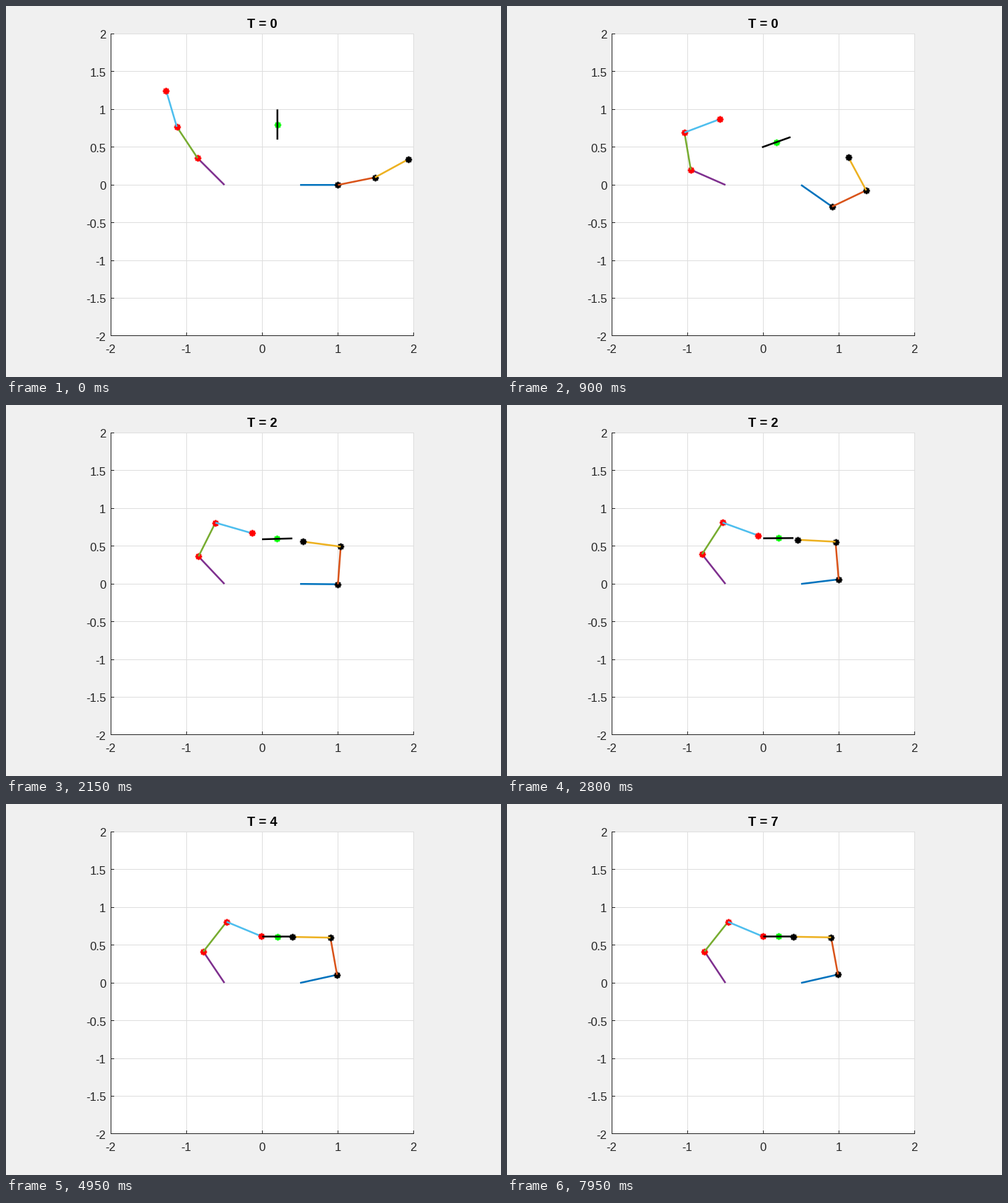
Animation, 700 px wide and 525 px high, one loop 8 s. Source, as a matplotlib script:

```python
import numpy as np
import matplotlib.pyplot as plt
from matplotlib.animation import FuncAnimation
from matplotlib.markers import MarkerStyle
from matplotlib.path import Path

W, H, DPI = 700, 525, 100
STEP_MS, FRAMES = 50, 160
PT = 72 / DPI                      # points per pixel
LINK, HALF_BAR = 0.5, 0.2
INK, GRID = "#262626", "#dedede"
DECAY = 1.15                       # settling rate per second

plt.rcParams["font.family"] = "Liberation Sans"
plt.rcParams["axes.unicode_minus"] = False

# Pose: three right link angles, three left link angles, bar tilt, bar x, bar y
KEY_T = np.array([0, 0.5, 1.35, 2.15])
KEYS = np.array([
    [0, 11.46, 28.65, 135, 123.54, 106.35, 90, 0.2, 0.8],
    [-31.4, 8.5, 73.6, 158.3, 118, 56.3, 42.3, 0.159, 0.596],
    [-21.2, 54.8, 150.5, 146.3, 81.4, -1.1, 8.3, 0.187, 0.577],
    [-0.5, 85.8, 172.5, 133.3, 63.4, -16.1, 1.6, 0.197, 0.597],
])
REST = np.array([12.9, 100.5, 179, 123.5, 51.6, -22.8, 0, 0.2, 0.615])

# Sum of decaying modes through the keys, starting with zero speed
POWERS = np.arange(1, 6)


def modes(t):
    return np.exp(-DECAY * np.multiply.outer(t, POWERS))


COEF = np.linalg.solve(np.vstack([modes(KEY_T), POWERS]),
                       np.vstack([KEYS - REST, np.zeros_like(REST)]))


def pose(t):
    return REST + modes(t) @ COEF


def px(x):
    return 362.4 + 107 * np.asarray(x)


def py(y):
    return 253.2 - 106.85 * np.asarray(y)


def pixel(v):
    return np.floor(v) + 0.5


fig = plt.figure(figsize=(W / DPI, H / DPI), dpi=DPI, facecolor="#f0f0f0")
ax = fig.add_axes([0, 0, 1, 1])
ax.set_xlim(0, W)
ax.set_ylim(H, 0)
ax.axis("off")


def rule(x, y, color, z):
    ax.plot(x, y, color=color, lw=PT, solid_capstyle="butt", zorder=z, snap=False)


def label(x, y, text, ha):
    ax.text(x, y, text, ha=ha, va="baseline", fontsize=16.67 * PT, color=INK)


LEFT, RIGHT, TOP, BOTTOM = 148, 577, 39, 467
ax.add_patch(plt.Rectangle((LEFT, TOP), RIGHT - LEFT, BOTTOM - TOP,
                           fc="white", ec="none", zorder=0))
for v in np.arange(-2, 2.1, 1):
    x = pixel(px(v))
    rule([x, x], [TOP, BOTTOM], GRID, 1)
    rule([x, x], [BOTTOM, BOTTOM - 5], INK, 2)
    label(px(v) - 0.3, 491, f"{v:g}", "center")
for v in np.arange(-2, 2.1, 0.5):
    y = pixel(py(v))
    rule([LEFT, RIGHT], [y, y], GRID, 1)
    rule([LEFT, LEFT + 5], [y, y], INK, 2)
    label(141.3, py(v) + 6.9, f"{v:g}", "right")
rule([LEFT + 0.5] * 2, [TOP, BOTTOM], INK, 2)
rule([LEFT, RIGHT], [BOTTOM - 0.5] * 2, INK, 2)
title = ax.text(362.5, 31, "", ha="center", va="baseline", weight="bold",
                fontsize=18.33 * PT, color="black")

# Eight-ray star used for joints and the bar centre
D = np.sqrt(0.5)
STAR = MarkerStyle(
    Path([(-1, 0), (1, 0), (0, -1), (0, 1), (-D, -D), (D, D), (-D, D), (D, -D)],
         [Path.MOVETO, Path.LINETO] * 4), capstyle="butt")


def segment(color, z):
    return ax.plot([], [], color=color, lw=2.5 * PT, solid_capstyle="butt",
                   zorder=z, snap=False)[0]


def star(color, z):
    return ax.plot([], [], ls="none", marker=STAR, ms=9.6 * PT, mec=color,
                   mfc="none", mew=2.5 * PT, zorder=z, snap=False)[0]


def make_arm(base, colors, joint_color):
    # Each link lies over the joint it starts from
    parts = [(segment(c, 3 + 2 * i), star(joint_color, 4 + 2 * i))
             for i, c in enumerate(colors)]
    return base, parts


right_arm = make_arm(0.5, ["#0072bd", "#d95319", "#edb120"], "black")
left_arm = make_arm(-0.5, ["#7e2f8e", "#77ac30", "#4dbeee"], "red")
centre = star("lime", 10)
bar = segment("black", 11)


def place_arm(arm, degrees):
    base, parts = arm
    a = np.radians(degrees)
    x = px(base + LINK * np.concatenate([[0], np.cumsum(np.cos(a))]))
    y = py(LINK * np.concatenate([[0], np.cumsum(np.sin(a))]))
    for i, (link, joint) in enumerate(parts):
        link.set_data(x[i:i + 2], y[i:i + 2])
        joint.set_data(x[i + 1:i + 2], y[i + 1:i + 2])


def draw(frame):
    p = pose(frame * STEP_MS / 1000)
    place_arm(right_arm, p[0:3])
    place_arm(left_arm, p[3:6])
    tilt, cx, cy = np.radians(p[6]), p[7], p[8]
    ends = np.array([-HALF_BAR, HALF_BAR])
    bar.set_data(px(cx + ends * np.cos(tilt)), py(cy + ends * np.sin(tilt)))
    centre.set_data([px(cx)], [py(cy)])
    title.set_text(f"T = {frame * STEP_MS // 1000}")
    return []


anim = FuncAnimation(fig, draw, frames=FRAMES, interval=STEP_MS,
                     repeat=True, repeat_delay=0, blit=False)
plt.show()
```
